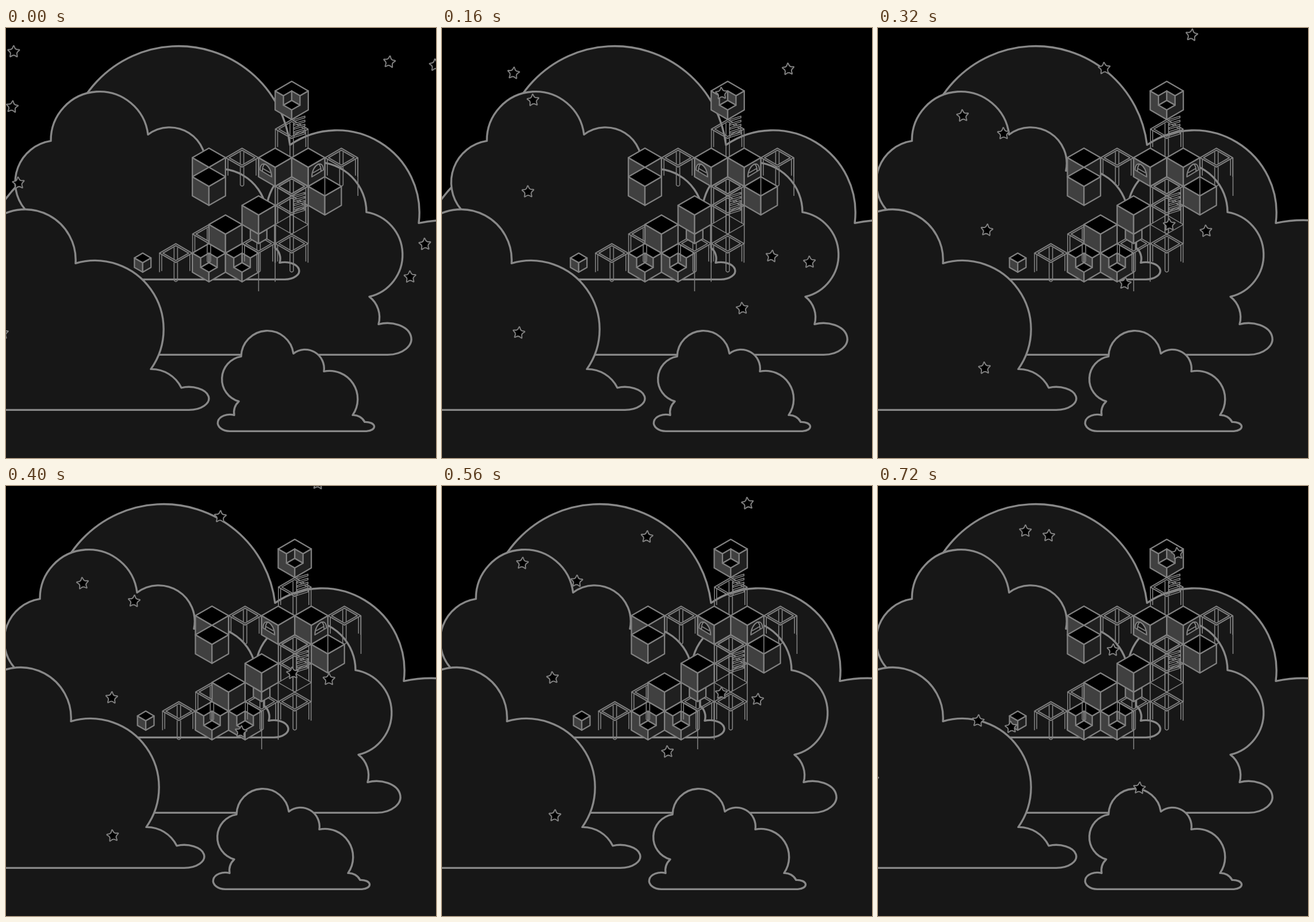
An HTML page with a canvas that plays this animation: 748 px wide and 748 px high, repeating every 0.8 s.

```html
<!DOCTYPE html>
<html>
<head>
<meta charset="utf-8">
<style>
html, body { margin: 0; width: 748px; height: 748px; overflow: hidden; background: #000; }
canvas { display: block; }
</style>
</head>
<body>
<canvas id="stage" width="748" height="748"></canvas>
<script>
const ctx = document.getElementById('stage').getContext('2d');
const STEP = 80, STEPS = 10;
const LINE = '#808080', LIT = '#404040', SHADE = '#202020', CLOUD = '#171717';

// Clouds from back to front; shift is the sideways jump in the second pose.
const clouds = [
  { shift: -26, d: 'M-90 800V420L-40 360Q0 285 40 255L105 226A195.2 195.2 0 0 1 494 203A143.5 143.5 0 0 1 718 339A231 231 0 0 1 814 339V800Z' },
  { shift: -19, d: 'M200 568V400H400L453 320A87 87 0 0 1 627 320A75 75 0 0 1 632 467A45 45 0 0 1 648 515A41.5 27.5 0 1 1 664 568Z' },
  { shift: -19, d: 'M33 437V315A73 73 0 0 1 78 196A84.8 84.8 0 0 1 247 185A62.7 62.7 0 0 1 346 248A84 84 0 0 1 452 310H468V382A24 24 0 0 1 476 408A25 15 0 1 1 485 437Z' },
  { shift: -8, d: 'M-40 664V355L-20 333A88 88 0 0 1 121 409A119.5 119.5 0 0 1 252 593A58 58 0 0 1 305 625.4A35 20 0 1 1 318 664Z' },
  { shift: -8, d: 'M390 701A21 14.5 0 1 1 397 673A27 27 0 0 1 405 649A40 40 0 0 1 409 571A45.7 45.7 0 0 1 500 566A33 33 0 0 1 553 597A49 49 0 0 1 603 673A22 22 0 0 1 624 685A15 8 0 1 1 627 701Z' }
];

// Resting place and lane: outer lanes travel further.
const stars = [
  [151, 161, -44], [222, 192, 2], [193, 360, -23], [189, 600, -8],
  [390, 62, 43], [542, 4, -2], [503, 334, 11], [567, 345, 13], [426, 436, 43]
].map(([x, y, lane], i) => ({ x, y, lane, side: i < 4 ? 1 : -1 }));

function paint(path, fill, width = 2.3, stroke = LINE) {
  if (fill) { ctx.fillStyle = fill; ctx.fill(path); }
  ctx.strokeStyle = stroke;
  ctx.lineWidth = width;
  ctx.stroke(path);
}

function poly(points, fill, width) {
  const path = new Path2D();
  points.forEach(([x, y]) => path.lineTo(x, y));
  path.closePath();
  paint(path, fill, width);
}

function line(x1, y1, x2, y2, width = 1.6) {
  paint(new Path2D(`M${x1} ${y1}L${x2} ${y2}`), null, width);
}

// Isometric grid: half a cube wide, a quarter of a cube high.
const W = 28.8, H = 16.6;
const gridX = col => 497 + col * W, gridY = row => 126 + row * H;

function diamond(x, y, w, fill, width) {
  const h = w * H / W;
  poly([[x, y - h], [x + w, y], [x, y + h], [x - w, y]], fill, width);
}

// The grid point is the corner where the three visible faces meet.
function cube(col, row, w = W) {
  const x = gridX(col), y = gridY(row), h = w * H / W;
  poly([[x - w, y - h], [x, y], [x, y + 2 * h], [x - w, y + h]], LIT);
  poly([[x + w, y - h], [x, y], [x, y + 2 * h], [x + w, y + h]], SHADE);
  diamond(x, y - h, w, '#000');
}

function notchedCube(col, row) {
  cube(col, row);
  const x = gridX(col), y = gridY(row), w = W / 2, h = H / 2;
  poly([[x - w, y - h], [x, y - H], [x, y], [x - w, y + h]], SHADE);
  poly([[x + w, y - h], [x, y - H], [x, y], [x + w, y + h]], LIT);
  diamond(x, y + h, w, '#000');
}

function tableTop(col, row) {
  diamond(gridX(col), gridY(row), W - 0.4, null, 2);
  diamond(gridX(col), gridY(row), 22.5, null, 1.8);
}

// Open table standing on thin double-lined legs.
function frame(col, row, legs = 2) {
  const x = gridX(col), y = gridY(row), drop = legs * H;
  for (const side of [-1, 1]) {
    line(x + side * 28.4, y, x + side * 28.4, y + drop);
    line(x + side * 24.5, y + 3, x + side * 24.5, y + drop - 2);
    line(x + side * 3, y - 10, x + side * 3, y + 11);
    line(x + side * 3, y + 16, x + side * 3, y + H + drop - 2);
  }
  line(x - 3, y + H + drop - 2, x, y + H + drop);
  line(x + 3, y + H + drop - 2, x, y + H + drop);
  tableTop(col, row);
}

function ladder(row) {
  const x = 501;
  for (let y = gridY(row), i = 0; i < 5; i++, y += 7) {
    poly([[x, y], [x + 19, y - 6], [x + 19, y - 3], [x, y + 3]], '#000', 1.6);
  }
}

function wire(col, from, to) {
  line(gridX(col), gridY(from), gridX(col), gridY(to));
}

function arch() {
  paint(new Path2D('M442 247C442 227 462 238 462 259ZM446 249C446 240 449 236 452 237M446 244L460 252'), CLOUD, 2);
}

function drawBuilding() {
  frame(0, 3);
  ladder(2);
  notchedCube(0, 0);

  cube(-5, 7);
  cube(-5, 9);
  frame(-3, 6);
  frame(0, 9, 4);
  frame(0, 11);
  cube(-1, 7);
  cube(1, 7);
  arch();
  ctx.save();
  ctx.transform(-1, 0, 0, 1, 2 * gridX(0), 0);
  arch();
  ctx.restore();
  cube(2, 10);
  frame(3, 6);
  wire(4, 6, 10);
  wire(2, 6, 10);
  tableTop(0, 9);
  ladder(10);
  diamond(gridX(0), gridY(13), W, null, 1.4);
  wire(-1, 9, 19);
  wire(1, 9, 15);

  frame(0, 15);
  frame(-7, 16);
  cube(-9, 17, W / 2);
  notchedCube(-5, 17);
  notchedCube(-3, 17);
  frame(-5, 14);
  cube(-4, 14);
  frame(-2, 15);
  wire(-2, 16, 20);
  cube(-2, 14, W / 2);
  cube(-2, 12);
}

// Soft five-pointed star: curves run between edge midpoints.
function drawStar(x, y, tilt) {
  const corner = i => {
    const angle = tilt + i * Math.PI / 5, r = i % 2 ? 4.5 : 13;
    return [x + r * Math.sin(angle), y - r * Math.cos(angle)];
  };
  const path = new Path2D();
  for (let i = 0; i <= 10; i++) {
    const [ax, ay] = corner(i), [bx, by] = corner(i + 1);
    const mid = [(ax + bx) / 2, (ay + by) / 2];
    if (i) path.quadraticCurveTo(ax, ay, ...mid); else path.moveTo(...mid);
  }
  paint(path, '#000', 2);
}

// Stars glide in, hover and fly on; the two sides mirror each other.
function starAt({ x, y, lane, side }, step) {
  const enter = -6.1 * Math.max(0, 4.8 - step) ** 2.25;
  const leave = 1.74 * Math.max(0, step - 5.4) ** 4 * (1 + lane / 100);
  const dx = enter + leave + 0.4 * lane * Math.min(step - 4, 1);
  const dy = -33 + 42 * Math.cos((step - 5.2) * Math.PI / 4) + 0.088 * lane * Math.max(0, 4 - step) ** 2;
  return [x + side * dx, y + side * dy];
}

function shifted(dx, dy, draw) {
  ctx.save();
  ctx.translate(dx, dy);
  draw();
  ctx.restore();
}

function render(now) {
  const step = Math.floor(now / STEP) % STEPS;
  const moved = step >= 4 ? 1 : 0;
  const drawCloud = c => shifted(c.shift * moved, 0.4, () => paint(new Path2D(c.d), CLOUD, 3.4, '#888'));
  ctx.fillStyle = '#000';
  ctx.fillRect(0, 0, 748, 748);
  ctx.lineJoin = 'round';
  clouds.slice(0, 3).forEach(drawCloud);
  shifted(5.3 * moved, 0, drawBuilding);
  clouds.slice(3).forEach(drawCloud);
  stars.forEach((star, i) => drawStar(...starAt(star, step), 0.12 * Math.sin(i * 2 + step)));
}

const start = performance.now();
function tick() {
  render(performance.now() - start);
  requestAnimationFrame(tick);
}
tick();
</script>
</body>
</html>
```
